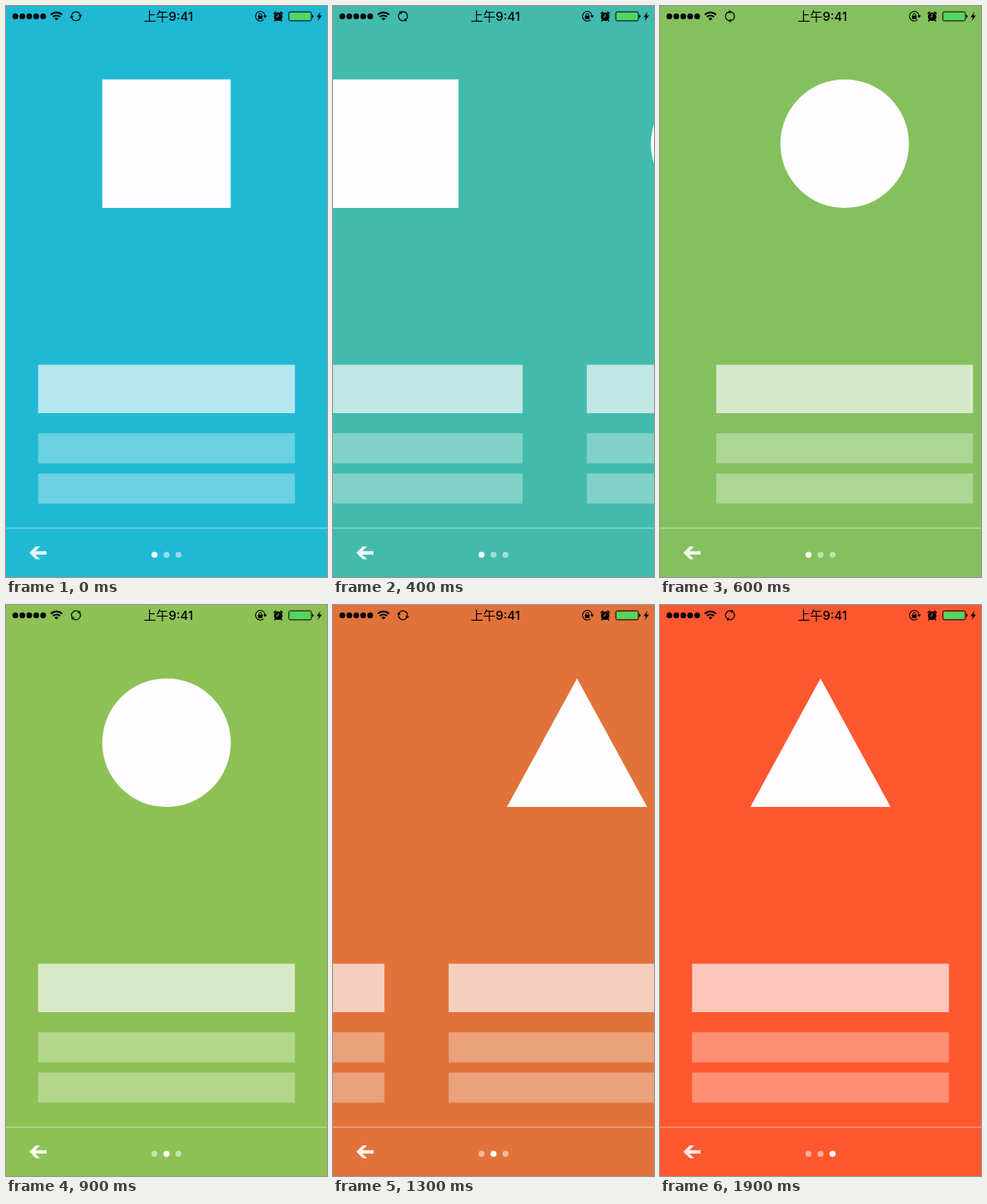
An HTML page that plays this animation: 388x690 px, repeating every 2000 ms.

```html
<!DOCTYPE html>
<html lang="zh">
<head>
<meta charset="utf-8">
<title>Pager</title>
<style>
  html, body { margin: 0; width: 100%; height: 100%; overflow: hidden; }
  body { --bg: rgb(32, 185, 211); background: var(--bg); }
  svg { display: block; width: 388px; height: 690px; }
  .time { font: 500 15px Inter, "Noto Sans CJK SC", "Noto Sans CJK", sans-serif; }
  .white { fill: #fffdff; }
  .line { fill: none; stroke: #000; }
  .hands { fill: none; stroke: var(--bg); }
</style>
</head>
<body>
<svg viewBox="0 0 388 690">
  <defs>
    <g id="bars" class="white">
      <rect x="38.8" y="433.5" width="310.4" height="58.5" opacity=".67"/>
      <rect x="38.8" y="516.3" width="310.4" height="36.4" opacity=".33"/>
      <rect x="38.8" y="564.9" width="310.4" height="36.4" opacity=".33"/>
    </g>
    <g id="halfSync">
      <path class="line" stroke-width="1.2" d="M-5 -1.8A5.3 5.3 0 0 1 5.3 0"/>
      <path d="M2.9 -.4H7.7L5.3 2.6Z"/>
    </g>
  </defs>

  <g id="pages">
    <g>
      <rect class="white" x="116.4" y="88.7" width="155.2" height="155.3"/>
      <use href="#bars"/>
    </g>
    <g transform="translate(388)">
      <circle class="white" cx="194" cy="166.4" r="77.7"/>
      <use href="#bars"/>
    </g>
    <g transform="translate(776)">
      <path class="white" d="M194 88.7L278.7 244H109.3Z"/>
      <use href="#bars"/>
    </g>
  </g>

  <!-- status bar -->
  <path stroke="#000" stroke-width="7" stroke-linecap="round" stroke-dasharray="0 8.4" d="M11.3 12.5H45.5"/>
  <g class="line" stroke-width="2">
    <path d="M54.2 10.6A9.6 9.6 0 0 1 67.8 10.6M56.7 13.2A6.1 6.1 0 0 1 65.3 13.2"/>
  </g>
  <path d="M61 17.6L58.6 15.2A3.4 3.4 0 0 1 63.4 15.2Z"/>
  <g id="sync">
    <use href="#halfSync"/>
    <use href="#halfSync" transform="rotate(180)"/>
  </g>
  <text class="time" x="196.3" y="18" text-anchor="middle">上午9:41</text>

  <path class="line" stroke-width="1.1" d="M311.4 16.6A5.8 5.8 0 1 1 313.2 12"/>
  <path d="M310.9 11.6H315.5L313.2 14.4Z"/>
  <rect x="304.7" y="11.8" width="5.4" height="4" rx=".4"/>
  <path class="line" stroke-width="1" d="M305.8 12V10.6A1.6 1.6 0 0 1 309 10.6V12"/>

  <circle cx="329" cy="12.9" r="5.2"/>
  <path class="line" stroke-width="1.6" stroke-linecap="round" d="M324 9L326 7.4M334 9L332 7.4M325.6 17L324.8 18M332.4 17L333.2 18"/>
  <path class="hands" stroke-width="1" d="M329 9.6V13.2H326.4"/>

  <rect class="line" x="341.9" y="7.1" width="27.2" height="10.8" rx="1.6"/>
  <rect x="343" y="8.2" width="25" height="8.6" rx=".6" fill="#4fd85f"/>
  <path d="M370 10.6Q371.8 11 371.8 12.5T370 14.4Z"/>
  <path d="M380.2 7L375.3 13.4H378.3L376.7 18.2L382 11.5H378.8Z"/>

  <!-- footer -->
  <rect class="white" y="630.4" width="388" height="1.2" opacity=".45"/>
  <path class="white" opacity=".88" d="M28.2 660.8L36 653H41.2L35.7 658.7H49V663H35.7L41.2 668.6H36Z"/>
  <g id="dots" class="white">
    <circle cx="179.5" cy="663.2" r="3.6"/>
    <circle cx="194" cy="663.2" r="3.6"/>
    <circle cx="208.5" cy="663.2" r="3.6"/>
  </g>
</svg>
<script>
  const LOOP = 2000, STEP = 100, WIDTH = 388;
  const colors = [[32, 185, 211], [141, 193, 85], [255, 88, 48]];
  const pages = document.getElementById('pages');
  const sync = document.getElementById('sync');
  const dots = [...document.getElementById('dots').children];

  // Finger drag up to the release, then exponential settling on the next page.
  function swipe(t, release, drag) {
    const dt = t - release;
    if (dt < 0) return drag * Math.max(0, 1 + dt / 150) ** 2;
    const rest = (WIDTH - drag) * 0.33 ** (dt / 100);
    return WIDTH - (rest < 1.2 ? 0 : rest);
  }

  function draw(t) {
    const offset = swipe(t, 400, 120) + swipe(t, 1200, 82);
    pages.setAttribute('transform', `translate(${-offset})`);

    const pos = offset / WIDTH;
    const i = Math.min(1, Math.floor(pos));
    const mix = colors[i].map((c, k) => Math.round(c + (colors[i + 1][k] - c) * (pos - i)));
    document.body.style.setProperty('--bg', `rgb(${mix})`);

    const active = t < 900 ? 0 : t < 1900 ? 1 : 2;
    dots.forEach((dot, n) => dot.setAttribute('opacity', n === active ? 1 : 0.52));

    sync.setAttribute('transform', `translate(84.6 12.4) rotate(${(t - 1200) * 0.16})`);
  }

  function frame() {
    const t = performance.now() % LOOP;
    draw(Math.floor(t / STEP) * STEP);
    requestAnimationFrame(frame);
  }
  frame();
</script>
</body>
</html>
```
